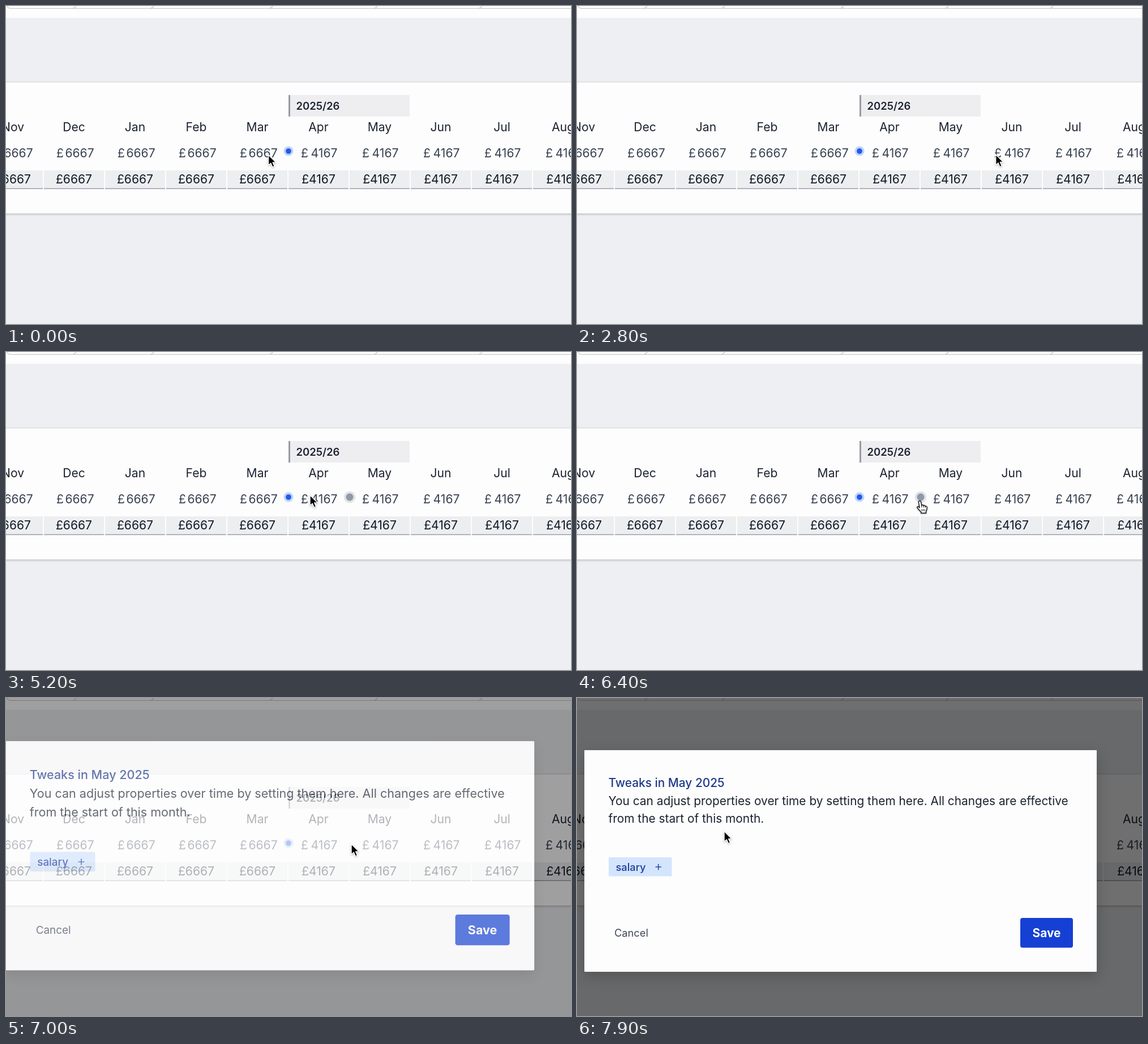
Recreate the animation shown at these times as an HTML page. Size 998x561 px, loop 8 s.

```html
<!DOCTYPE html>
<html lang="en">
<head>
<meta charset="utf-8">
<title>Monthly tweaks</title>
<style>
  html, body { margin: 0; width: 100%; height: 100%; overflow: hidden; background: #eeeff2; }
  svg { display: block; width: 998px; height: 561px; }
  text { font: 400 21.1px Inter, "Liberation Sans", sans-serif; fill: #1b2230; white-space: pre; }
  .mid { text-anchor: middle; }
  .input { fill: #374151; }
  .total { fill: #111827; }
  .small { font-size: 18.5px; }
  .medium { font-weight: 500; }
  .strong { font-weight: 600; }
  #modal text { font-size: 20.85px; }
  #modal .small { font-size: 18.25px; }
  #sheet { filter: drop-shadow(0 1px 2px rgba(0, 0, 0, .28)); }
  #panel { filter: drop-shadow(0 8px 12px rgba(0, 0, 0, .2)); }
  .cursor { filter: drop-shadow(0 1.5px 1.5px rgba(0, 0, 0, .3)); }
</style>
</head>
<body>
<svg viewBox="0 0 998 561">
  <rect width="998" height="561" fill="#eeeff2"/>
  <rect width="998" height="21" fill="#fdfdfd"/>
  <path id="tabs" fill="none" stroke="#c9cacb" stroke-width="1.2"/>
  <rect id="sheet" x="-20" y="135" width="1038" height="231" fill="#fdfdfd"/>

  <rect x="499" y="157" width="214" height="38" fill="#eeeef1"/>
  <rect x="499" y="157" width="3" height="38" fill="#989ba3"/>
  <text class="small strong" x="512.5" y="182.5">2025/26</text>

  <g id="columns"></g>
  <circle cx="499" cy="256" r="8.5" fill="#bdd3fb"/>
  <circle cx="499" cy="256" r="4.8" fill="#2159e8"/>
  <g id="dots"></g>

  <g id="modal">
    <!-- The dim surrounds the panel, so nothing behind the panel is darkened -->
    <path d="M-500-500H1500V1100H-500ZM13 92V483H918V92Z" fill="#000" fill-opacity=".56" fill-rule="evenodd"/>
    <rect id="panel" x="13" y="92" width="905" height="391" rx="3" fill="#fdfdfd"/>
    <text class="medium" x="55.5" y="157" style="fill:#1e3a8a">Tweaks in May 2025</text>
    <text x="55.5" y="188.7">You can adjust properties over time by setting them here. All changes are effective</text>
    <text x="55.5" y="220.4">from the start of this month.</text>
    <rect x="56" y="281" width="111.5" height="33.5" rx="2" fill="#d3e5fd"/>
    <text class="small medium" x="68.5" y="304.5" style="fill:#1e3a9f">salary</text>
    <path d="M138.5 298h10.5M143.7 292.7v10.6" stroke="#2a48a5" stroke-width="1.6"/>
    <text class="small" x="66" y="421" style="fill:#3f4856">Cancel</text>
    <rect x="783" y="388" width="93" height="52.5" rx="4" fill="#1640d4"/>
    <text class="mid" x="829.5" y="421.7" style="fill:#fff;font-weight:700">Save</text>
  </g>

  <g id="arrow" class="cursor">
    <path d="M0 0V18.6L4.3 14.7L7.2 21.6L10.6 20.2L7.7 13.4H13.4Z" stroke="#fff" stroke-width="1.4" stroke-linejoin="round"/>
  </g>
  <g id="hand" class="cursor">
    <path d="M-2 2C-2-.5 2-.5 2.2 2L3.4 8.2C4 6.6 6.4 6.8 6.8 8.6C7.6 7.4 9.6 7.8 10 9.6C11.4 8.8 13 9.8 13 11.6C13 15.4 12 17 11.2 18.6V21.6H2.4V19.6C0 17.6-2 14.8-4.2 12.4C-5.4 10.6-3 9.2-1.4 10.8L-.2 12Z" fill="#fff" stroke="#111" stroke-width="1.4" stroke-linejoin="round"/>
    <path d="M3.4 8.2V11.6M6.8 8.6V11.8M10 9.6V12M3.6 14.5V18M6.2 14.5V18M8.8 14.5V18" stroke="#222" stroke-width="1.1" fill="none"/>
  </g>
</svg>
<script>
const LOOP = 8000, STEP = 100;
const byId = id => document.getElementById(id);
const clamp = v => Math.max(0, Math.min(1, v));
const mix = (a, b, p) => a + (b - a) * p;
const smooth = p => (1 - Math.cos(Math.PI * p)) / 2;

byId('tabs').setAttribute('d', 'M2 0Q3 4.3 9 4.3H998' +
  [118, 255, 465, 650, 835].map(x => `M${x} 4.3Q${x + 4} 3.5 ${x + 6} 0`).join(''));

const months = ['Nov', 'Dec', 'Jan', 'Feb', 'Mar', 'Apr', 'May', 'Jun', 'Jul', 'Aug'];
byId('columns').innerHTML = months.map((name, i) => {
  const x = 12 + i * 108, pay = i < 5 ? '6667' : '4167';
  return `<rect x="${x - 53}" y="290" width="106" height="32" fill="#eceef0"/>
    <rect x="${x - 53}" y="321.5" width="106" height="1.4" fill="#9897ac"/>
    <text class="mid" x="${x}" y="220.8">${name}</text>
    <text class="input" x="${x - 31}" y="266.7">£</text>
    <text class="input mid" x="${x + 10}" y="266.7">${pay}</text>
    <text class="total mid" x="${x}" y="313">£${pay}</text>`;
}).join('');

// Hover dots: x, time shown, time left
const hovers = [[823, 3400, 3950], [715, 4350, 4450], [607, 4850, 5100], [607, 6100, 6700]];
const dots = hovers.map(([x]) => {
  const dot = document.createElementNS('http://www.w3.org/2000/svg', 'g');
  dot.innerHTML = `<circle cx="${x}" cy="256" r="10.3" fill="#e1e3e5"/>
    <circle cx="${x}" cy="256" r="6.5" fill="#8f99a7"/>`;
  byId('dots').append(dot);
  return dot;
});

// Pointer path: time, x, y
const path = [[0, 463.5, 262.5], [1900, 617.5, 261.5], [3500, 822, 262.5], [3800, 822, 262.5],
  [5200, 537, 252.5], [6200, 605, 263], [6700, 606, 262], [7000, 610, 257.5], [7900, 260, 235]];
const handTimes = [[3400, 3950], [6100, 6800]];

function pointer(t) {
  const i = path.findIndex(k => k[0] > t);
  if (i < 0) return path.at(-1).slice(1);
  const [t0, x0, y0] = path[i - 1], [t1, x1, y1] = path[i];
  const p = smooth((t - t0) / (t1 - t0));
  return [mix(x0, x1, p), mix(y0, y1, p)];
}

function draw(t) {
  const [x, y] = pointer(t);
  const isHand = handTimes.some(([a, b]) => t >= a && t < b);
  for (const [id, on] of [['arrow', !isHand], ['hand', isHand]]) {
    byId(id).setAttribute('transform', `translate(${x} ${y})`);
    byId(id).style.display = on ? '' : 'none';
  }
  hovers.forEach(([, a, b], i) => {
    dots[i].style.opacity = Math.min(clamp((t - a) / 150), clamp((b + 250 - t) / 150));
  });

  const open = clamp((t - 6800) / 300);
  const rest = 1 - open, scale = 1 + rest * .1;
  byId('modal').style.opacity = open;
  byId('modal').setAttribute('transform',
    `translate(465.5 ${287.5 - rest * 28}) scale(${scale}) translate(-465.5 -287.5)`);
}

const start = performance.now();
function tick() {
  const t = (performance.now() - start + 8) % LOOP;
  draw(Math.floor(t / STEP) * STEP);
  requestAnimationFrame(tick);
}
tick();
</script>
</body>
</html>
```
